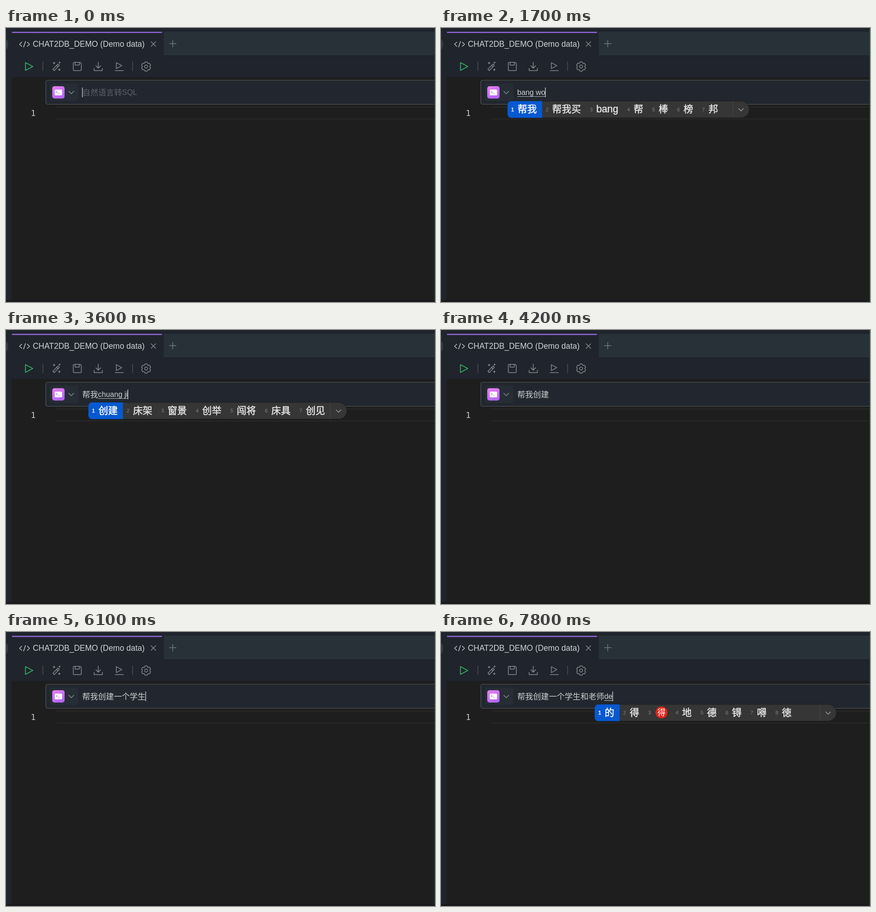
Animation, 937 px wide and 598 px high, one loop 8000 ms. Source, as an HTML page:

```html
<!DOCTYPE html>
<html lang="zh-CN">
<head>
<meta charset="utf-8">
<title>SQL editor</title>
<style>
  html, body { margin: 0; width: 100%; height: 100%; overflow: hidden; background: #1e1e1e; }
  svg { display: block; width: 937px; height: 598px; }
  text { font-family: "Liberation Sans", "Noto Sans CJK SC", "Noto Sans CJK", sans-serif; white-space: pre; }
  .icon { fill: none; stroke: #858b91; stroke-width: 1.5; stroke-linecap: round; stroke-linejoin: round; }
  .line { font-family: "DejaVu Sans Mono", monospace; font-size: 18px; fill: #c6c6c6; }
</style>
</head>
<body>
<svg viewBox="0 0 937 598">
  <defs>
    <linearGradient id="pink" x1="0" y1="0" x2=".5" y2="1">
      <stop offset="0" stop-color="#e980ee"/><stop offset="1" stop-color="#b565f4"/>
    </linearGradient>
  </defs>

  <!-- window -->
  <rect width="937" height="598" fill="#20242c"/>
  <rect x="344.500" y="8" width="593" height="52" fill="#293138"/>
  <path d="M345 60.5H937M12 107.5H937" stroke="#191d22"/>
  <rect x="12" y="108" width="925" height="490" fill="#1e1e1e"/>
  <rect y="594" width="937" height="4" fill="#191a1d"/>
  <path d="M0 25a5 11 0 0 1 0 22z" fill="#343a41"/>
  <rect x="13" y="8.300" width="328" height="2.700" rx="1" fill="#8a62cf"/>

  <!-- tab -->
  <g class="icon">
    <path d="M34.500 31L29.500 35.500l5 4.500M42.500 29.500l-4 12M46.500 31l5 4.500-5 4.500" stroke="#c4c8cc"/>
    <path d="M317 30l10 10m0-10l-10 10"/>
    <path d="M357 34.300h14.500M364.200 27v14.500" stroke="#717980"/>
  </g>
  <text x="58.500" y="41" font-size="17.480" fill="#cfd2d6">CHAT2DB_DEMO (Demo data)</text>

  <!-- toolbar -->
  <g class="icon" transform="translate(0 -.4)">
    <path d="M42.500 76v17l16-8.500z" stroke="#35b566" stroke-width="1.700"/>
    <path d="M80.500 74.500v19M276.500 74.500v19" stroke="#4b5158"/>
    <path d="M102.500 90.500l11-11.500 3 3-11 11.500zM110.500 82l3 3M105 75v4m-2-2h4M117 74.500v3m-1.500-1.500h3M116.500 89.500v4m-2-2h4"/>
    <path d="M149 75.500h13l2.500 2.500v13.500a2 2 0 0 1-2 2h-13.500a2 2 0 0 1-2-2v-14a2 2 0 0 1 2-2zM151 75.500v6h9v-6"/>
    <path d="M201.500 75v13m-5-5l5 5 5-5M192.500 88.500v5h18v-5"/>
    <path d="M241 76v13l12-6.500zM238.500 93.500h18"/>
    <path id="gear"/><circle cx="306" cy="84.500" r="3.400"/>
  </g>

  <!-- editor line and prompt box -->
  <path d="M110 172.500H937M110 198.500H937" stroke="#292929" stroke-width="2"/>
  <text class="line" x="54" y="192">1</text>
  <rect x="87" y="114" width="870" height="52.500" rx="4" fill="#22272f" stroke="#555b59" stroke-width="1.200"/>
  <rect x="96" y="121" width="62" height="38" rx="5" fill="#262d35"/>
  <rect x="101" y="127" width="27" height="27" rx="5" fill="url(#pink)"/>
  <rect x="106.500" y="134.500" width="16" height="12.500" rx="1.500" fill="#fff"/>
  <path d="M109.500 138l2.500 2-2.500 2M113.500 142.500h3.500" fill="none" stroke="#c46bf0" stroke-width="1.200"/>
  <path class="icon" d="M137 138l5.500 5.500 5.500-5.500"/>
  <g id="live"></g>
  <path d="M936.500 0V598" stroke="#1f5634"/>
</svg>

<script>
const LOOP = 8000, LEFT = 166.5;
const live = document.getElementById('live');

document.getElementById('gear').setAttribute('d', 'M' + [...Array(6).keys()].flatMap(i =>
  [[-24, 8.3], [-13, 10.4], [13, 10.4], [24, 8.3]].map(([turn, r]) => {
    const a = (i * 60 - 90 + turn) * Math.PI / 180;
    return `${306 + r * Math.cos(a)} ${84.5 + r * Math.sin(a)}`;
  })).join('L') + 'Z');

// time, committed text, pinyin being typed, candidates, caret
const bangWo = '帮我 帮我买 bang 帮 棒 榜 邦';
const chuangJ = '创建 床架 窗景 创举 闯将 床具 创见';
const xueSheng = '学生 学生会 学 雪 血 薛 穴';
const laoShi = '老师 老是 老实 老 劳 捞 牢';
const steps = [
  [0, '', '', '', 1],
  [400, '', '', '', 0],
  [900, '', 'b', '不 吧 把 被 比 别 本 并', 1],
  [1000, '', 'ba', '吧 把 八 爸 罢 拔 巴 霸', 1],
  [1200, '', 'bang', '帮 棒 榜 邦 绑 磅 傍 膀', 1],
  [1400, '', 'bang', bangWo, 1],
  [1500, '', 'bang w', bangWo, 1],
  [1700, '', 'bang wo', bangWo, 1],
  [2000, '帮我', '', '', 1],
  [2200, '帮我', 'c', '才 出 从 错 吃 此 次 车', 1],
  [2300, '帮我', 'chu', '出 处 除 初 楚 触 厨 储', 1],
  [2500, '帮我', 'chuan', '穿 传 船 @ship 川 串 喘 出岸', 1],
  [3000, '帮我', 'chuang j', chuangJ, 1],
  [3600, '帮我', 'chuang ji', chuangJ, 1],
  [3700, '帮我', 'chuang jian', '创建 创见 窗间 床间 创 窗 床', 1],
  [4200, '帮我创建', '', '', 0],
  [4500, '帮我创建', 'y', '一 有 也 要 又 用 与 以', 1],
  [4700, '帮我创建', 'yi ge', '一个 一格 以及 一 已 以 亿', 1],
  [5000, '帮我创建一个', '', '', 1],
  [5100, '帮我创建一个', 'x', '下 想 小 向 新 先 像 些', 1],
  [5200, '帮我创建一个', 'xue', '学 雪 血 薛 穴 靴 削 谑', 1],
  [5500, '帮我创建一个', 'xue sheng', xueSheng, 1],
  [6000, '帮我创建一个学生', '', '', 1],
  [6300, '帮我创建一个学生', 'he', '和 喝 何 河 合 盒 贺 核', 1],
  [6500, '帮我创建一个学生和', '', '', 1],
  [6700, '帮我创建一个学生和', 'l', '了 来 啦 里 两 老 路 拉', 1],
  [6800, '帮我创建一个学生和', 'lao', '拉 辣 @hot 啦 喇 蜡 腊 垃', 1],
  [7000, '帮我创建一个学生和', 'lao s', laoShi, 1],
  [7100, '帮我创建一个学生和', 'lao shi', laoShi, 1],
  [7400, '帮我创建一个学生和老师', '', '', 1],
  [7700, '帮我创建一个学生和老师', 'd', '的 都 到 对 大 点 但 等', 1],
  [7800, '帮我创建一个学生和老师', 'de', '的 得 @deal 地 德 锝 嘚 徳', 1],
];

function add(tag, attrs, content = '') {
  const node = document.createElementNS('http://www.w3.org/2000/svg', tag);
  for (const key in attrs) node.setAttribute(key, attrs[key]);
  if (tag === 'g') node.innerHTML = content; else node.textContent = content;
  live.append(node);
  return node;
}

// draws a text and returns its width; bold thickens the strokes a little
function write(x, y, size, fill, content, bold = 0) {
  const node = add('text', { x, y, 'font-size': size, fill, stroke: fill, 'stroke-width': bold }, content);
  return node.getComputedTextLength();
}

// small pictures, centred on 0,0
const emoji = {
  ship: `<path d="M-13 0L-5 3H13L10 9H-8Z" fill="#c8453c"/><path d="M-12 -2L-5 1H13V3H-6Z" fill="#d9dadb"/>
    <path d="M-4 1V-5H11V1Z" fill="#c9cdd0"/><path d="M0 -5V-8H10V-5Z" fill="#eceeef"/>
    <path d="M-2 -2H10" stroke="#66717c" stroke-dasharray="2 1.500"/><path d="M4 -8V-11H7V-8Z" fill="#596069"/>
    <path d="M-9 9H11" stroke="#86342f" stroke-width="2"/>`,
  hot: `<circle r="12" fill="#f07a26"/><path d="M-11 -5A12 12 0 0 1 11 -5Q0 -1 -11 -5Z" fill="#e9542e"/>
    <path d="M-8 -4l5 1.500M8 -4l-5 1.500" stroke="#5a2a16" stroke-width="1.500"/>
    <circle cx="-4.500" cy="-.5" r="1.700" fill="#4b2312"/><circle cx="4.500" cy="-.5" r="1.700" fill="#4b2312"/>
    <path d="M-5 5Q0 2 6 5Q1 9 -5 5Z" fill="#56220f"/><path d="M0 5h5v4a2.500 2.500 0 0 1-5 0z" fill="#ec5a7b"/>
    <path d="M-9 1q5 8 0 9q-5-1 0-9M10 -9q4 6 0 7q-4-1 0-7" fill="#a9dcf5"/>`,
  deal: `<circle r="13" fill="#e0241b"/><text y="6.500" font-size="18" text-anchor="middle" fill="#fff">得</text>`,
};

function popup(left, top, words) {
  const panel = add('path', { fill: '#353635', stroke: '#1b1b1b' });
  const blue = add('path', { fill: '#0759d1' });
  const size = (path, width, r) => path.setAttribute('d',
    `M${left + 8} ${top}H${left + width - r}a${r} ${r} 0 0 1 ${r} ${r}v${36.5 - 2 * r}a${r} ${r} 0 0 1 ${-r} ${r}` +
    `H${left + 8}a8 8 0 0 1-8-8v-20.500a8 8 0 0 1 8-8z`);
  let x = left;
  words.split(' ').forEach((word, i) => {
    write(x + 8, top + 22, 11, i ? '#858585' : '#fff', i + 1, i ? 0 : .5);
    if (word[0] === '@') {
      add('g', { transform: `translate(${x + 37} ${top + 17.5})` }, emoji[word.slice(1)]);
      x += 60;
    } else {
      x += 33.5 + write(x + 22, top + 24.5, /[a-z]/.test(word) ? 21.6 : 21, i ? '#e6e6e6' : '#fff', word, .5);
    }
    if (!i) size(blue, x - left, 0);
  });
  const width = Math.max(492, x - left), edge = left + width;
  size(panel, width + 36, 18);
  add('path', { d: `M${edge} ${top + 1}v34.500`, stroke: '#484948' });
  add('path', { d: `M${edge + 12.5} ${top + 16}l5.500 5.500 5.500-5.500`, fill: 'none', stroke: '#a0a0a0', 'stroke-width': 1.5 });
}

function draw([, done, typing, words, caret]) {
  live.replaceChildren();
  if (words) popup(LEFT + done.length * 17.3 - 21.2, done ? 158 : 159.5, words);
  let x = LEFT;
  if (done) x += write(x, 146.5, 17.3, '#cdd0d3', done);
  if (typing) {
    const width = write(x, 146, 16.2, '#cdd0d3', typing);
    add('path', { d: `M${x} 149.500h${width}`, stroke: '#b9bdc0', 'stroke-width': 1.2 });
    x += width;
  }
  if (!done && !typing) {
    const width = write(x + .5, 146.5, 17.3, '#5c636a', '自然语言转');
    write(x + .5 + width, 146, 16.5, '#5c636a', 'SQL');
  }
  if (caret) add('path', { d: `M${x + .3} 130v21`, stroke: '#dde0e2', 'stroke-width': 1.3 });
}

let shown;
function tick() {
  const t = performance.now() % LOOP;
  const step = steps.findLast(s => s[0] <= t);
  if (step !== shown) draw(shown = step);
  requestAnimationFrame(tick);
}
tick();
</script>
</body>
</html>
```
